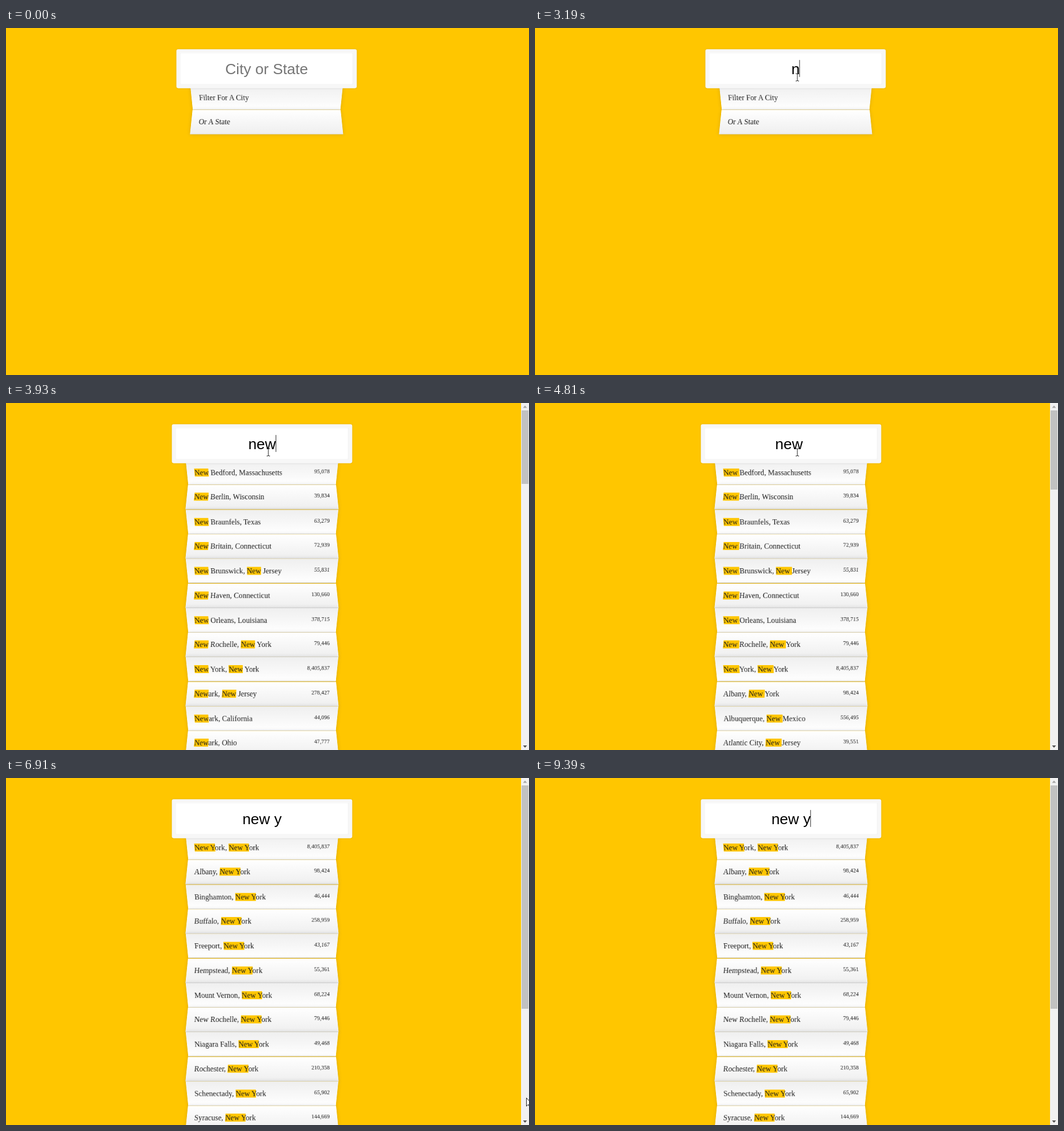
These frames come from a looping animation (919x609 px, 9.67 s). An HTML page:

```html
<!DOCTYPE html>
<html lang="en">
<head>
<meta charset="utf-8">
<title>Type ahead</title>
<style>
  html, body { margin: 0; width: 919px; height: 609px; overflow: hidden; background: #ffc600; }
  body { position: relative; }
  #page { position: absolute; top: 0; left: 8px; width: 1090px; transform: scale(.8255); transform-origin: 0 0; }
  #search {
    position: absolute; z-index: 2; left: 353px; top: 45px; width: 384px; height: 83px;
    box-sizing: border-box; border: 8px solid #f7f7f7; border-radius: 4px; background: #fff;
    box-shadow: 0 0 4px rgba(0,0,0,.12), inset 0 0 1.6px rgba(0,0,0,.19);
    font: 32px/36px "Liberation Sans", Arial, sans-serif; text-align: center; white-space: pre;
  }
  #search div { position: absolute; top: 16px; left: 0; right: 0; }
  #hint { color: #757575; }
  #field { position: relative; }
  #caret { position: absolute; left: 100%; top: -1px; margin-left: -.6px; width: 1px; height: 36px; background: #000; }
  #list {
    position: absolute; left: 385px; top: 120.18px; width: 320px; margin: 0; padding: 0;
    font: 16px/19.27px "Liberation Serif", "Times New Roman", serif; color: #1c1c1c;
  }
  li {
    display: flex; justify-content: space-between; padding: 16px;
    border-bottom: 1px solid #d8d8d8; white-space: pre; box-shadow: 0 0 8px rgba(0,0,0,.14);
  }
  li:nth-child(odd) {
    transform: perspective(80px) rotateX(-3deg) translateY(2.4px);
    background: linear-gradient(to top, #fff, #efefef);
  }
  li:nth-child(even) {
    transform: perspective(80px) rotateX(3deg) translateY(1.6px) scale(1.001);
    background: linear-gradient(to bottom, #fff, #efefef);
  }
  li small { font-size: 12px; line-height: normal; }
  mark { background: #ffc600; color: inherit; }
  #bar { position: absolute; left: 905px; top: 0; width: 14px; height: 609px; background: #f1f1f1; }
  #thumb { position: absolute; left: 1px; top: 13px; width: 12px; background: #c1c1c1; }
  svg { position: absolute; z-index: 3; left: 0; top: 0; overflow: visible; }
</style>
</head>
<body>
<div id="page">
  <div id="search">
    <div id="hint">City or State</div>
    <div><span id="field"><span id="typed"></span><span id="caret"></span></span></div>
  </div>
  <ul id="list"></ul>
</div>
<div id="bar">
  <div id="thumb"></div>
  <svg width="14" height="609"><path d="M3.5 8.5h7L7 4.5z" fill="#a3a3a3"/><path d="M3.5 601h7L7 605z" fill="#505050"/></svg>
</div>
<svg width="919" height="609">
  <path id="arrow" d="M.5.5V15l3.3-3.1 2.5 5.3 2-.9-2.4-5.1h4.7z" fill="#fff" stroke="#000" stroke-width=".9"/>
  <path id="beam" d="M-3-6.5h2l1 1 1-1h2M0-5.5v11M-3 6.5h2l1-1 1 1h2" fill="none" stroke="#222"/>
</svg>
<script>
const LOOP = 9670, BLINK = 531;
const $ = id => document.getElementById(id);

const cities = `Albany, New York|98,424
Albuquerque, New Mexico|556,495
Atlantic City, New Jersey|39,551
Binghamton, New York|46,444
Buffalo, New York|258,959
Freeport, New York|43,167
Hempstead, New York|55,361
Mount Vernon, New York|68,224
Nampa, Idaho|86,518
Napa, California|79,068
Naperville, Illinois|144,864
Nashua, New Hampshire|87,137
Nashville-Davidson, Tennessee|634,464
National City, California|59,834
New Bedford, Massachusetts|95,078
New Berlin, Wisconsin|39,834
New Braunfels, Texas|63,279
New Britain, Connecticut|72,939
New Brunswick, New Jersey|55,831
New Haven, Connecticut|130,660
New Orleans, Louisiana|378,715
New Rochelle, New York|79,446
New York, New York|8,405,837
Newark, New Jersey|278,427
Newark, California|44,096
Newark, Ohio|47,777
Niagara Falls, New York|49,468
Rochester, New York|210,358
Schenectady, New York|65,902
Syracuse, New York|144,669`.split('\n').map(line => line.split('|'));

// [time, text in the field]
const typing = [[2180, ''], [3190, 'n'], [3460, 'ne'], [3730, 'new'], [4270, 'new '], [5130, 'new y']];
// [time, query shown in the list, scroll thumb height]
const results = [[0, '', 0], [3390, 'n', 17], [3590, 'ne', 47], [3930, 'new', 129], [4460, 'new ', 139], [5200, 'new y', 392]];
// [time, x, y] of the pointer
const moves = [
  [1710, 505, -10], [2180, 481.5, 67], [2380, 481.5, 67], [2380, 461, 86.5],
  [6200, 461, 86.5], [6710, 907, 392], [6910, 907, 392], [6910, 914, 561],
  [7850, 853, 556], [8050, 853, 556], [8120, 849, 553], [8330, 849, 553],
  [8390, 845, 553], [8730, 845, 553], [8920, 841, 580]
];

const latest = (steps, t) => steps.filter(step => step[0] <= t).pop();

function rows(query) {
  if (!query) return '<li>Filter For A City</li><li>Or A State</li>';
  const starts = name => name.toLowerCase().startsWith(query);
  return cities
    .filter(([name]) => name.toLowerCase().includes(query))
    .sort(([a], [b]) => starts(b) - starts(a))
    .slice(0, 12)
    .map(([name, people]) =>
      `<li><span>${name.replace(new RegExp(query, 'gi'), '<mark>$&</mark>')}</span><small>${people}</small></li>`)
    .join('');
}

function pointerAt(t) {
  const i = moves.findIndex(move => move[0] > t);
  if (i < 1) return null;
  const [t0, x0, y0] = moves[i - 1], [t1, x1, y1] = moves[i];
  const u = (t - t0) / (t1 - t0), k = u * u * (3 - 2 * u);
  return [x0 + (x1 - x0) * k, y0 + (y1 - y0) * k];
}

function drawPointer(t) {
  const p = pointerAt(t);
  const inField = p && p[0] > 298 && p[0] < 602 && p[1] > 44 && p[1] < 99;
  $('arrow').style.display = p && !inField ? '' : 'none';
  $('beam').style.display = inField ? '' : 'none';
  if (!p) return;
  const place = `translate(${p[0]} ${p[1]})`;
  $('arrow').setAttribute('transform', place);
  $('beam').setAttribute('transform', place);
}

let shown;
function draw(now) {
  const t = now % LOOP;
  const key = latest(typing, t), [, query, thumb] = latest(results, t);
  const text = key ? key[1] : '';
  $('typed').textContent = text;
  $('hint').style.display = text ? 'none' : '';
  $('caret').style.display = key && Math.floor((t - key[0]) / BLINK) % 2 === 0 ? '' : 'none';
  if (query !== shown) {
    shown = query;
    $('list').innerHTML = rows(query);
    $('page').style.left = query ? '0' : '8px';
    $('bar').style.display = query ? '' : 'none';
    $('thumb').style.height = thumb + 'px';
  }
  drawPointer(t);
}

const start = performance.now();
function tick() {
  draw(performance.now() - start);
  requestAnimationFrame(tick);
}
tick();
</script>
</body>
</html>
```
